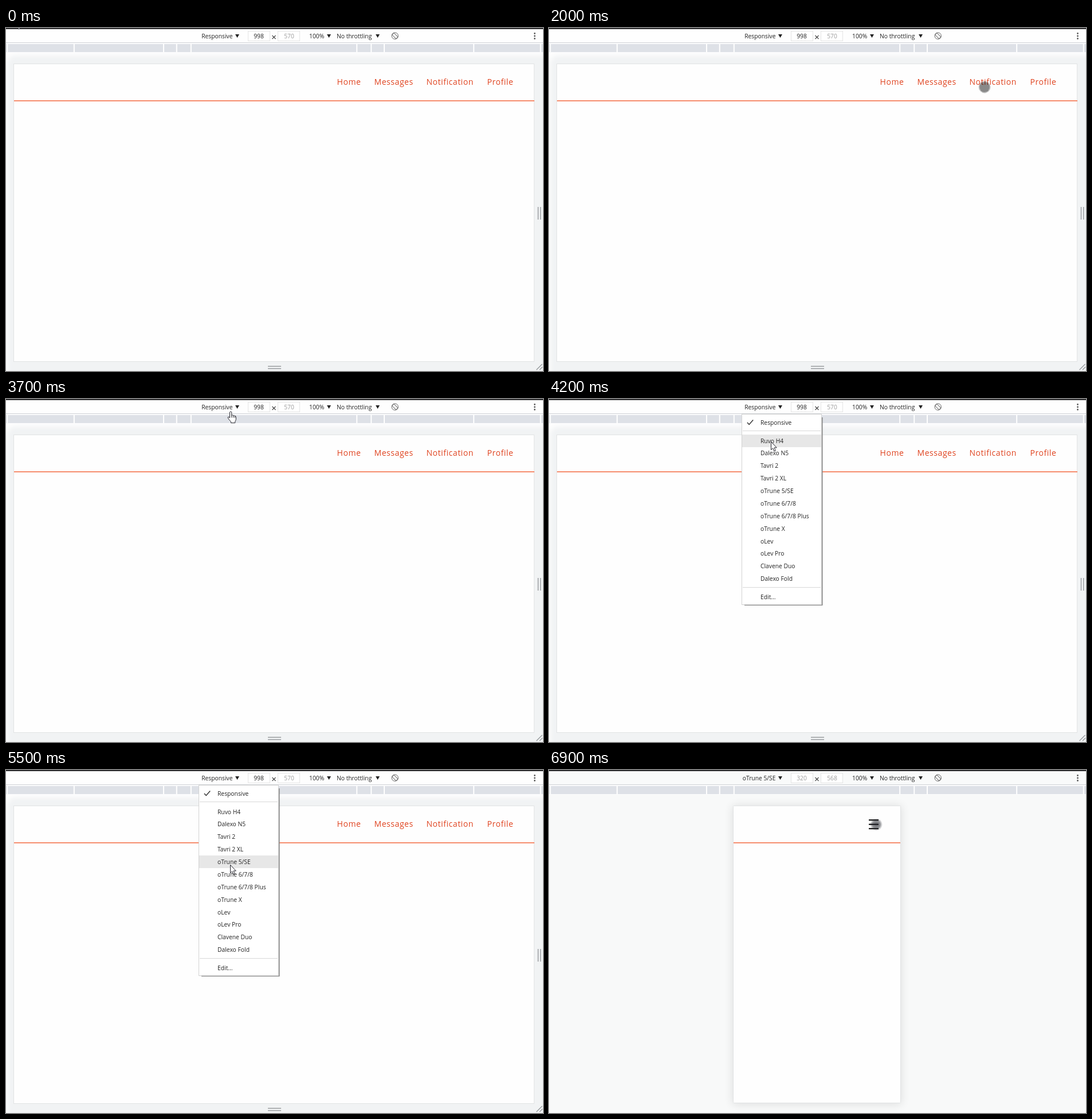
These frames come from a looping animation (937x598 px, 8 s). An HTML page:

```html
<!DOCTYPE html>
<html lang="en">
<head>
<meta charset="utf-8">
<title>Responsive navigation</title>
<style>
  html, body { margin: 0; width: 100%; height: 100%; overflow: hidden; background: #fff; }
  svg { display: block; width: 937px; height: 598px; }
  text { font: 10.3px "Open Sans", "Noto Sans", sans-serif; fill: #222; }
  .nav { font-size: 14px; letter-spacing: .55px; fill: #e04420; }
  .mid { text-anchor: middle; }
  .end { text-anchor: end; }
  .dim { fill: #9b9b9b; }
  .box { fill: #fff; stroke: #e4e4e4; }
  .band { fill: #f1f3f4; }
  .grip { stroke: #9a9da0; stroke-width: 1.5; fill: none; }
  .page { fill: #fefefe; stroke: #e1e3e4; }
  .rule { fill: #f5815f; }
  .pointer { fill: #fff; stroke: #23232b; stroke-width: 1; stroke-linejoin: round; }
</style>
</head>
<body>
<svg viewBox="0 0 937 598">
  <defs>
    <filter id="soft" x="-10%" y="-10%" width="120%" height="120%"><feGaussianBlur stdDeviation="4"/></filter>
    <filter id="glow" x="-20%" y="-20%" width="140%" height="140%"><feGaussianBlur stdDeviation="8"/></filter>
    <radialGradient id="press">
      <stop offset="0" stop-color="#22242c" stop-opacity=".68"/>
      <stop offset=".6" stop-color="#22242c" stop-opacity=".5"/>
      <stop offset="1" stop-color="#22242c" stop-opacity="0"/>
    </radialGradient>
  </defs>

  <rect id="back" width="937" height="598"/>

  <g id="wide">
    <rect class="band" x="2" y="48" width="960" height="575" rx="14" filter="url(#soft)"/>
    <rect class="band" x="922" y="63" width="15" height="535"/>
    <rect class="band" x="14" y="582" width="923" height="16"/>
    <rect class="page" x="13.5" y="62.5" width="908" height="519"/>
    <rect class="rule" x="14" y="126" width="908" height="1.8"/>
    <text class="nav" x="577.5" y="99">Home</text>
    <text class="nav" x="642.5" y="99">Messages</text>
    <text class="nav" x="733.5" y="99">Notification</text>
    <text class="nav" x="839.5" y="99">Profile</text>
    <path class="grip" d="M457 589.7h23M457 593.7h23M928.5 312v22M932.7 312v22M925.5 596l10-10M931 596l5-5"/>
  </g>

  <g id="phone">
    <rect x="320" y="62" width="295" height="521" fill="#000" opacity=".1" filter="url(#glow)"/>
    <rect class="page" x="321.5" y="62.5" width="292" height="518" rx="1"/>
    <rect class="rule" x="322" y="126" width="291" height="1.8"/>
    <path d="M558 87.3h17M558 94.8h17M558 102.2h17" stroke="#000" stroke-width="2"/>
  </g>

  <g id="ruler">
    <rect y="26" width="937" height="17" fill="#fcfcfd"/>
    <rect y="28" width="937" height="14" fill="#dee1e7"/>
  </g>

  <g id="bar">
    <rect id="strip" width="937" height="25"/>
    <rect width="937" height="2" fill="#2b2b2d"/>
    <rect y="25" width="937" height="1" fill="#cfd2d6"/>
    <text id="device" class="end" x="395.5" y="18"></text>
    <path d="M400 11h7l-3.5 6zM560 11h7l-3.5 6zM645 11h7l-3.5 6z" fill="#222"/>
    <rect class="box" x="422.5" y="5.5" width="38" height="17"/>
    <rect class="box" x="474.5" y="5.5" width="38" height="17"/>
    <text id="w" class="mid" x="441" y="18"></text>
    <text id="h" class="mid dim" x="494" y="18"></text>
    <path d="M464.5 13l6 6M470.5 13l-6 6" stroke="#444" stroke-width="1.1"/>
    <text x="529" y="18">100%</text>
    <text x="577" y="18">No throttling</text>
    <g fill="none" stroke="#666">
      <circle cx="678.7" cy="13.7" r="5.7"/>
      <rect x="676.4" y="8.7" width="4.6" height="10" rx="1" transform="rotate(-45 678.7 13.7)"/>
    </g>
    <path d="M922.5 9.5h0M922.5 14h0M922.5 18.5h0" stroke="#555" stroke-width="2.8" stroke-linecap="round"/>
  </g>

  <g id="menu">
    <rect x="341" y="32" width="136.5" height="328" fill="#858585"/>
    <rect x="336.5" y="26.5" width="139" height="332" fill="#fff" stroke="#d2d2d2"/>
    <rect id="hover" x="337" width="138" height="22" fill="#e7e7e7"/>
    <path d="M338 55.5h136M338 328.5h136" stroke="#d8d8d8"/>
    <path d="M346 41l3.2 3.5 7-8" fill="none" stroke="#333" stroke-width="1.5"/>
  </g>

  <g id="cursor">
    <g id="touch">
      <circle r="8.7" fill="#000" opacity=".46"/>
      <circle r="9.5" fill="none" stroke="#000" stroke-opacity=".25" stroke-width="1.8"/>
    </g>
    <circle id="tap" r="11" fill="url(#press)"/>
    <path id="arrow" class="pointer" d="M.5 .5v14.2l3.2-3 2.2 5.3 2.4-1-2.2-5.1h4.2z"/>
    <path id="hand" class="pointer" d="M-.5 12V1.8Q1.2-.6 2.7 1.8V7.5Q4.5 6 5.6 8 7.3 6.7 8.3 8.8 10 8 10.3 10.5V14.5Q10 16.5 8.7 18.3V20.7H1.5V18.5Q-1.5 16-3.8 11.8-3.8 9.3-1.8 10.5zM2.7 7.5v4M5.6 8v3.5M8.3 8.8v3"/>
  </g>
</svg>
<script>
const LOOP = 8000, STEP = 100;
const MENU_OPEN = 3800, SWITCH = 5900, TAP = 6900;
const ROW = 21.87;

// Pointer moves: it leaves at `from`, arrives at x, y at `to`, then rests
const HOME = [16, -15];
const moves = [
  { from: 100, to: 1000, x: 821, y: 102 },
  { from: 1000, to: 1200, x: 854, y: 110 },
  { from: 1400, to: 1500, x: 870, y: 106 },
  { from: 1600, to: 1700, x: 881, y: 104 },
  { from: 1700, to: 2400, x: 574, y: 102 },
  { from: 2700, to: 2800, x: 460, y: 69 },
  { from: 2800, to: 3000, x: 382, y: 40 },
  { from: 3100, to: 3700, x: 391, y: 21 },
  { from: 4000, to: 4300, x: 386, y: 93 },
  { from: 4400, to: 4800, x: 385, y: 137 },
  { from: 4800, to: 5200, x: 390, y: 167 },
  { from: 5400, to: 5600, x: 391, y: 163 },
  { from: 5900, to: 6500, x: 588, y: 99 },
  { from: 6600, to: 6900, x: 571, y: 95 }
];

const models = ["Ruvo H4", "Dalexo N5", "Tavri 2", "Tavri 2 XL", "oTrune 5/SE", "oTrune 6/7/8",
  "oTrune 6/7/8 Plus", "oTrune X", "oLev", "oLev Pro", "Clavene Duo", "Dalexo Fold"];
const rows = ["Responsive", ...models, "Edit..."].map((name, i) => {
  const gaps = (i > 0) + (i > models.length);
  return { name, y: 41 + i * ROW + gaps * 9.7 };
});

const $ = id => document.getElementById(id);
const show = (id, on) => $(id).setAttribute("visibility", on ? "visible" : "hidden");
const ease = k => k * k * (3 - 2 * k);

function add(parent, tag, attrs, label = "") {
  const el = document.createElementNS("http://www.w3.org/2000/svg", tag);
  for (const key in attrs) el.setAttribute(key, attrs[key]);
  el.textContent = label;
  $(parent).append(el);
}

// Screen widths marked on both sides of the ruler's centre
for (const width of [320, 375, 425, 768, 1024])
  for (const side of [-1, 1])
    add("ruler", "rect", { x: 466.5 + side * (width * .4553 - 1), y: 28, width: 2, height: 14, fill: "#fff" });

for (const { name, y } of rows) add("menu", "text", { x: 369, y: Math.round(y) + 4 }, name);

function pointAt(t) {
  let [x, y] = HOME;
  for (const m of moves) {
    if (t <= m.from) break;
    const k = ease(Math.min(1, (t - m.from) / (m.to - m.from)));
    x += (m.x - x) * k;
    y += (m.y - y) * k;
  }
  return [Math.round(x), Math.round(y)];
}

function render(time) {
  const t = Math.floor(time / STEP) * STEP;
  const small = t >= SWITCH, menu = t >= MENU_OPEN && !small;
  const [x, y] = pointAt(t);

  show("wide", !small);
  show("phone", small);
  $("back").setAttribute("fill", small ? "#f8f9f9" : "#fefefe");
  $("strip").setAttribute("fill", small ? "#f9fafa" : "#fefefe");
  $("device").textContent = small ? models[4] : "Responsive";
  $("w").textContent = small ? 320 : 998;
  $("w").classList.toggle("dim", small);
  $("h").textContent = small ? 568 : 570;

  const row = rows.find(r => Math.abs(y - r.y) < ROW / 2);
  show("menu", menu);
  show("hover", menu && row);
  if (row) $("hover").setAttribute("y", Math.round(row.y - 11));

  const shape = t >= TAP ? "tap"
    : !menu && y > 62 ? "touch"
    : t > 3100 && y < 26 ? "hand" : "arrow";
  for (const id of ["touch", "tap", "arrow", "hand"]) show(id, id === shape);
  $("cursor").setAttribute("transform", `translate(${x} ${y})`);
}

const start = performance.now();
function tick() {
  render((performance.now() - start) % LOOP);
  requestAnimationFrame(tick);
}
tick();
</script>
</body>
</html>
```
